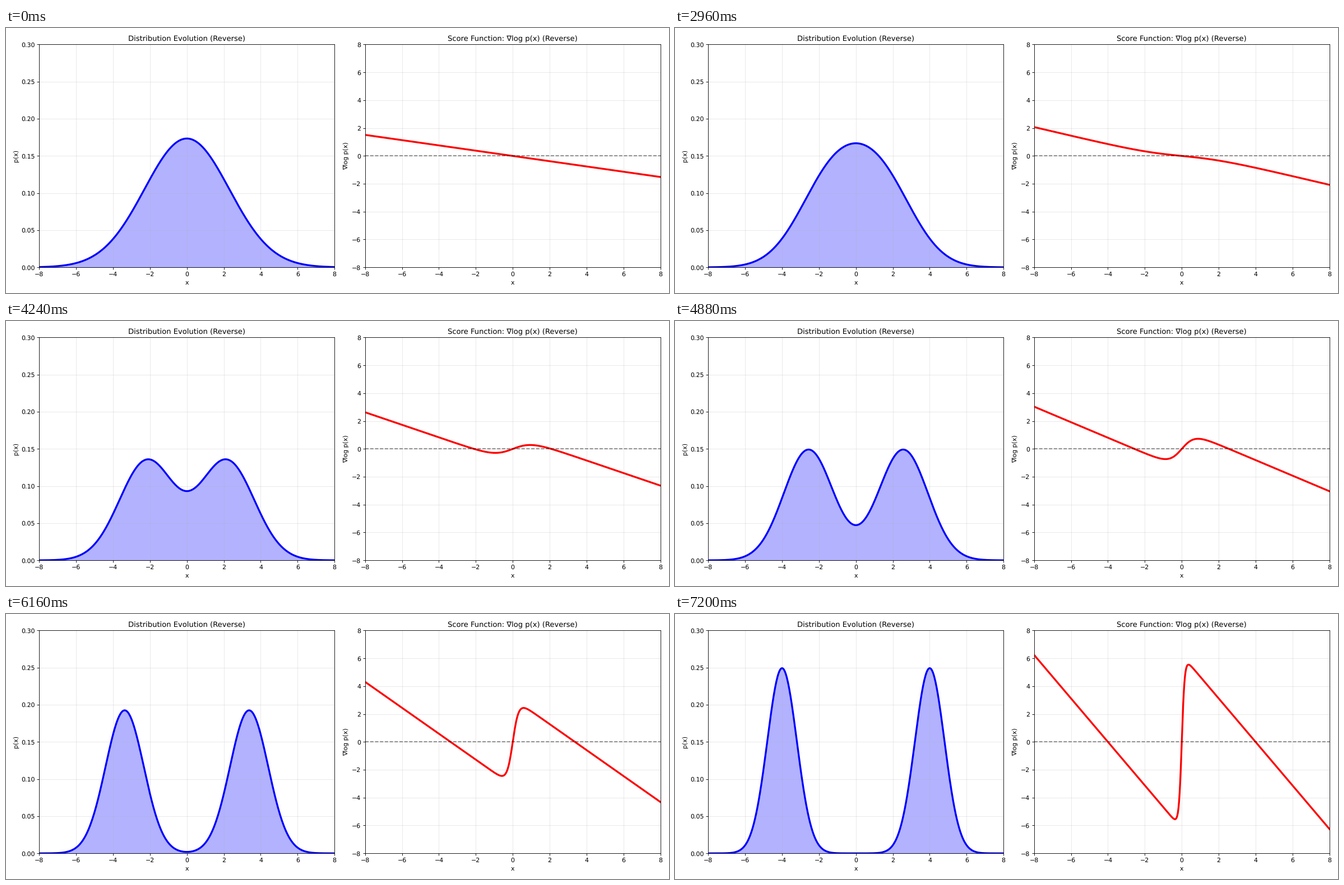
These frames come from a looping animation (1183 px wide and 473 px high, 8 s). A matplotlib script:

```python
import numpy as np
import matplotlib.pyplot as plt
from matplotlib.animation import FuncAnimation

WIDTH, HEIGHT = 1183, 473
DPI = WIDTH / 15
FRAMES, INTERVAL = 200, 40
HOLD, MOVE = 20, 160

plt.rcParams.update({
    "font.family": "DejaVu Sans",
    "font.size": 10,
    "text.hinting": "none",
})

x = np.linspace(-8, 8, 500)


def mixture(progress):
    """Density and score of two equal Gaussians that part and sharpen."""
    mean = 4 * progress
    sigma = 2.3 - 1.5 * progress
    bells = sum(np.exp(-((x - c) / sigma) ** 2 / 2) for c in (-mean, mean))
    density = bells / (2 * sigma * np.sqrt(2 * np.pi))
    score = (mean * np.tanh(mean * x / sigma**2) - x) / sigma**2
    return density, score


def progress_at(frame):
    step = frame - HOLD
    if step < 2:
        return 0.0
    return min(step / (MOVE - 1), 1.0)


def add_panel(left, right, title, ylabel, ylim):
    top, bottom = 29.5, 427.2
    ax = fig.add_axes([left / WIDTH, 1 - bottom / HEIGHT,
                       (right - left) / WIDTH, (bottom - top) / HEIGHT])
    ax.set(xlim=(-8, 8), ylim=ylim, title=title, xlabel="x", ylabel=ylabel)
    ax.grid(True, alpha=0.3)
    return ax


fig = plt.figure(figsize=(WIDTH / DPI, HEIGHT / DPI), dpi=DPI)
density_ax = add_panel(59.3, 586.2, "Distribution Evolution (Reverse)",
                       "p(x)", (0, 0.3))
score_ax = add_panel(640.7, 1167.7, "Score Function: ∇log p(x) (Reverse)",
                     "∇log p(x)", (-8, 8))

density, score = mixture(0)
density_line, = density_ax.plot(x, density, color="blue", linewidth=3)
density_fill = density_ax.fill_between(x, density, color="blue", alpha=0.3)
score_line, = score_ax.plot(x, score, color="red", linewidth=3)
score_ax.axhline(0, color="black", linestyle="--", alpha=0.5)


def update(frame):
    density, score = mixture(progress_at(frame))
    density_line.set_ydata(density)
    score_line.set_ydata(score)
    outline = np.column_stack([np.r_[x[0], x, x[-1]], np.r_[0, density, 0]])
    density_fill.set_verts([outline])
    return density_line, density_fill, score_line


anim = FuncAnimation(fig, update, frames=FRAMES, interval=INTERVAL,
                     repeat=True, repeat_delay=0, blit=False)
plt.show()
```
